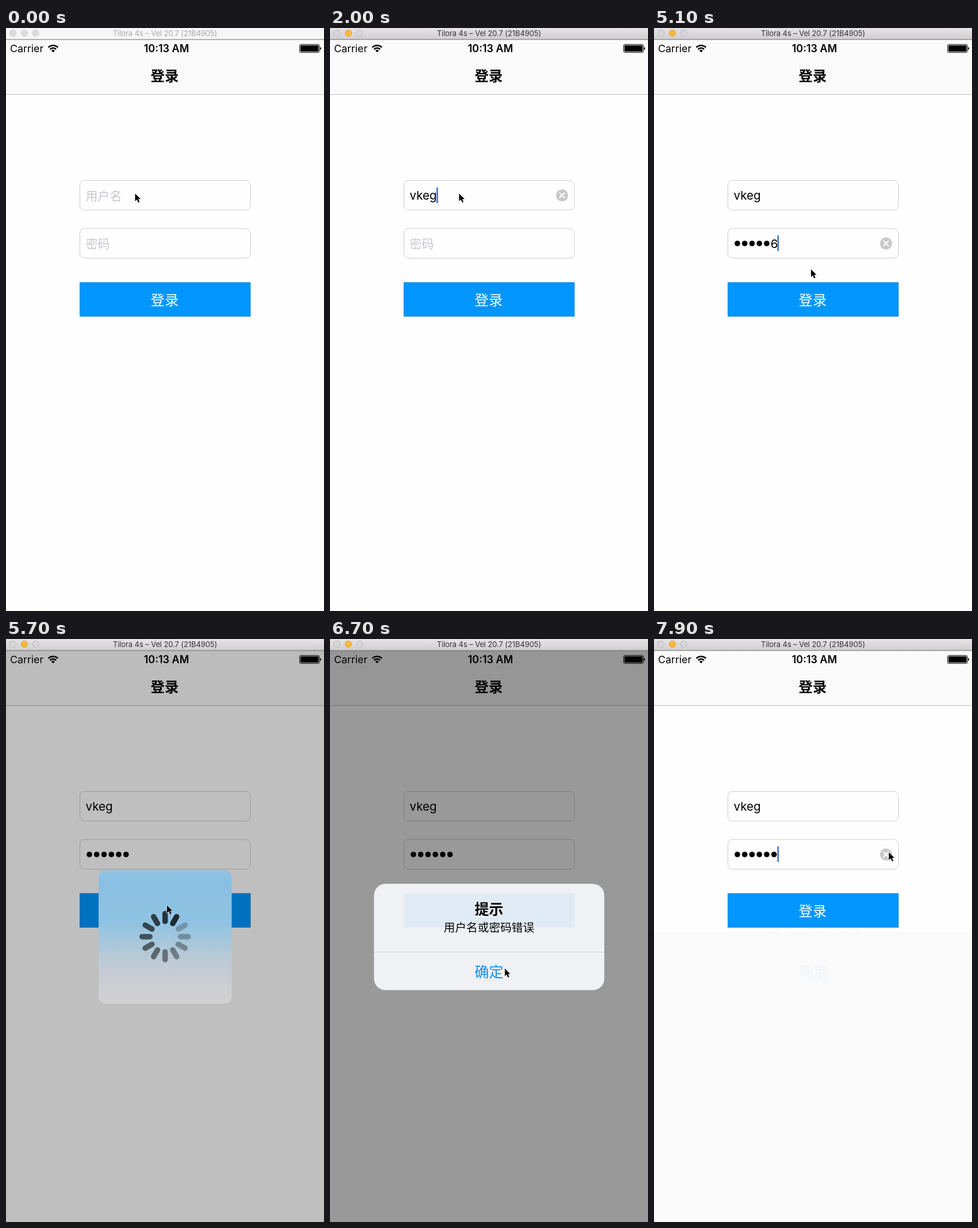
These frames come from a looping animation (553 by 1012 pixels, 8000 ms). An HTML page:

```html
<!DOCTYPE html>
<html lang="zh">
<head>
<meta charset="utf-8">
<title>登录</title>
<style>
html, body { margin: 0; width: 100%; height: 100%; overflow: hidden; background: #fefefe; }
svg { display: block; }
text { font-family: Inter, "Noto Sans CJK SC", "Noto Sans CJK", sans-serif; }
.mid { text-anchor: middle; }
.bold { font-weight: 600; }
.hint { font-size: 21px; fill: #c7c7cd; }
.typed { font-size: 20.6px; }
.field { fill: #fefefe; stroke: #cdcdcd; }
.caret { fill: #3d6fd0; }
</style>
</head>
<body>
<svg width="553" height="1012" viewBox="0 0 553 1012">
  <defs>
    <linearGradient id="bar" x2="0" y2="1">
      <stop stop-color="#e6e4e6"/><stop offset="1" stop-color="#cfcdcf"/>
    </linearGradient>
    <linearGradient id="sky" x2="0" y2="1">
      <stop stop-color="#93c2e0"/><stop offset=".1" stop-color="#89bfe4"/>
      <stop offset=".4" stop-color="#90c3e2"/><stop offset=".62" stop-color="#b4c9d7"/>
      <stop offset=".8" stop-color="#cacbd2"/><stop offset="1" stop-color="#d2d2d2"/>
    </linearGradient>
    <clipPath id="low"><rect y="508" width="553" height="504"/></clipPath>
    <g id="clear">
      <circle r="10.5" fill="#c8c8ca"/>
      <path d="M-4-4 4 4M4-4-4 4" stroke="#fff" stroke-width="2.2" stroke-linecap="round"/>
    </g>
    <g id="notice">
      <path d="M76.5 543.5H477" stroke="#000" stroke-opacity=".12"/>
      <text class="mid bold" x="276.5" y="478" font-size="25">提示</text>
      <text class="mid" x="276.5" y="508.3" font-size="19.7">用户名或密码错误</text>
      <text class="mid" x="276.5" y="586.5" font-size="25" fill="#0e8ef2">确定</text>
    </g>
  </defs>

  <rect width="553" height="1012" fill="#fefefe"/>
  <rect y="20" width="553" height="95" fill="#fafafa"/>
  <path d="M0 115.5H553" stroke="#bcbcbc"/>
  <text x="7" y="42.3" font-size="17.8">Carrier</text>
  <g fill="none" stroke="#000" stroke-width="2.5">
    <path d="M73.6 33.6a11.8 11.8 0 0 1 16.6 0M76.7 37a7.4 7.4 0 0 1 10.4 0"/>
    <path d="M81.9 42.3 78.9 39.2a4.3 4.3 0 0 1 6 0z" fill="#000" stroke="none"/>
  </g>
  <text class="mid bold" x="279" y="42.3" font-size="18">10:13 AM</text>
  <rect x="510.5" y="28.5" width="34.5" height="14" rx="2.5" fill="none" stroke="#000"/>
  <rect x="512" y="30" width="31.5" height="11" rx="1.2"/>
  <path d="M546 33q2 .6 2 2.5t-2 2.5z"/>
  <text class="mid bold" x="276" y="92" font-size="24.4">登录</text>

  <rect class="field" x="128.5" y="264.5" width="296.5" height="51.5" rx="8"/>
  <rect class="field" x="128.5" y="348" width="296.5" height="51.5" rx="8"/>
  <text class="hint" id="hintName" x="138.5" y="299">用户名</text>
  <text class="hint" id="hintPass" x="138.5" y="382">密码</text>
  <text class="typed" id="name" x="138.5" y="298.3"></text>
  <g id="dots"></g>
  <text class="typed" id="digit" y="381.5"></text>
  <use href="#clear" id="clearName" x="403.5" y="290.5"/>
  <use href="#clear" id="clearPass" x="403.5" y="374"/>
  <rect class="caret" id="caret" width="2.6" height="27"/>
  <rect x="128" y="441.5" width="297" height="59.5" fill="#0096fd"/>
  <rect x="128.5" y="442" width="296.5" height="58.5" fill="none" stroke="#1f8cd6"/>
  <text class="mid" x="276" y="481" font-size="24.4" font-weight="300" fill="#fff">登录</text>

  <g id="residue" clip-path="url(#low)">
    <rect y="508" width="553" height="504" fill="#fafafa"/>
    <use href="#notice" opacity=".05"/>
  </g>
  <rect id="shade" y="20" width="553" height="992"/>
  <g id="alert">
    <rect x="76.5" y="425" width="400.5" height="184.5" rx="20" fill="#fafbff" fill-opacity=".9"/>
    <use href="#notice"/>
  </g>
  <rect id="mask" y="20" width="553" height="992"/>
  <g id="hud">
    <rect x="161" y="401" width="231.5" height="232" rx="13" fill="url(#sky)"/>
    <rect id="grey" x="161" y="401" width="231.5" height="232" rx="13" fill="#cccdd0"/>
    <g id="spin" transform="translate(276.7 516.7)" stroke="#000" stroke-width="9.5" stroke-linecap="round"></g>
  </g>

  <rect width="553" height="20" id="strip"/>
  <path d="M0 20H553" stroke="#6a6a6a"/>
  <g id="lights"></g>
  <text class="mid" id="caption" x="276.5" y="14" font-size="13" letter-spacing="-.1">Tilora 4s – Vel 20.7 (21B4905)</text>
  <path id="mouse" d="M0 0V13.2L3.1 10.3 5.4 15.4 7.7 14.4 5.5 9.5H9.6z" stroke="#fff" stroke-width="1.1" paint-order="stroke"/>
</svg>
<script>
const LOOP = 8000, STEP = 100, PITCH = 12.75;
const user = { text: "vkeg", start: 500, gap: 400 };
const pass = { text: "123456", start: 3800, gap: 250 };

// each pointer move: when it starts, how long it takes, where it ends
const home = { x: 224.5, y: 287.5 };
const moves = [
  { start: 2100, time: 400, x: 256, y: 366 },
  { start: 3700, time: 400, x: 273, y: 419 },
  { start: 5100, time: 300, x: 280, y: 462.5 },
  { start: 6100, time: 400, x: 304, y: 572 },
  { start: 6800, time: 760, x: 408.5, y: 370.5 }
];

const $ = id => document.getElementById(id);
const set = (el, attrs) => { for (const k in attrs) el.setAttribute(k, attrs[k]); };
const show = (id, amount) => set($(id), { opacity: +amount });
const clamp = (v, lo = 0, hi = 1) => Math.min(hi, Math.max(lo, v));

function add(parent, tag, attrs) {
  const el = document.createElementNS("http://www.w3.org/2000/svg", tag);
  set(el, attrs);
  return parent.appendChild(el);
}

function ease(t, from, to) {
  const p = clamp((t - from) / (to - from));
  return p * p * (3 - 2 * p);
}

const keysHit = (field, t) =>
  clamp(Math.floor((t - field.start) / field.gap) + 1, 0, field.text.length);

const dots = [...pass.text].map((_, i) =>
  add($("dots"), "circle", { cx: 145 + i * PITCH, cy: 374, r: 4.8 }));
const spokes = Array.from({ length: 12 }, (_, i) =>
  add($("spin"), "path", { d: "M0-26.5V-40", transform: `rotate(${i * 30})` }));
const lights = [12, 32, 51.5].map(cx =>
  add($("lights"), "circle", { cx, cy: 9, r: 5.7 }));

function drawWindow(active) {
  set($("strip"), { fill: active ? "url(#bar)" : "#f6f6f6" });
  set($("caption"), { fill: active ? "#333" : "#a9a9a9" });
  lights.forEach((c, i) => set(c, active
    ? { fill: i === 1 ? "#fdb93e" : "#d8d6d8", stroke: i === 1 ? "#e0a033" : "#b9b7b9" }
    : { fill: "#dcdcdc", stroke: "#d0d0d0" }));
}

function drawFields(t) {
  const inName = t >= 200 && t < 2500;
  const inPass = (t >= 2500 && t < 5500) || t >= 7300;
  const typed = keysHit(user, t), hidden = keysHit(pass, t);
  const plain = hidden > 0 && t < 5500;

  $("name").textContent = user.text.slice(0, typed);
  $("digit").textContent = plain ? pass.text[hidden - 1] : "";
  set($("digit"), { x: 139 + (hidden - 1) * PITCH });
  dots.forEach((d, i) => set(d, { opacity: +(i < hidden - plain) }));
  show("hintName", !typed);
  show("hintPass", !hidden);
  show("clearName", inName && typed);
  show("clearPass", inPass && hidden);

  const width = !inName ? hidden * PITCH : typed ? $("name").getComputedTextLength() : 0;
  const blink = clamp(.5 + 1.6 * Math.cos(t / 1000 * 2 * Math.PI));
  set($("caret"), { x: 138 + width, y: inName ? 277 : 360, opacity: inName || inPass ? blink : 0 });
}

function drawHud(t) {
  const seen = ease(t, 5500, 5700) - ease(t, 5820, 6100);
  show("hud", seen);
  show("mask", .25 * seen);
  show("grey", ease(t, 5700, 5900));
  const head = Math.floor((t - 5590) * 12 / 1000);
  spokes.forEach((s, i) => {
    const age = (((head - i) % 12) + 12) % 12;
    set(s, { opacity: .78 - age * .05 });
  });
}

function drawAlert(t) {
  const enter = ease(t, 5700, 5940), seen = enter - ease(t, 7000, 7200);
  show("shade", .4 * seen);
  show("alert", seen);
  show("residue", t >= 7200);
  set($("alert"), { transform: `translate(276.7 517) scale(${1.2 - .2 * enter}) translate(-276.7 -517)` });
}

function drawMouse(t) {
  let { x, y } = home;
  for (const m of moves) {
    const p = ease(t, m.start, m.start + m.time);
    x += (m.x - x) * p;
    y += (m.y - y) * p;
  }
  set($("mouse"), { transform: `translate(${x} ${y})` });
}

function draw(t) {
  drawWindow(t >= 200);
  drawFields(t);
  drawHud(t);
  drawAlert(t);
  drawMouse(t);
}

const begin = performance.now();
function frame(now) {
  const t = Math.max(0, now - begin) % LOOP;
  draw(Math.floor(t / STEP) * STEP);
  requestAnimationFrame(frame);
}
draw(0);
requestAnimationFrame(frame);
</script>
</body>
</html>
```
